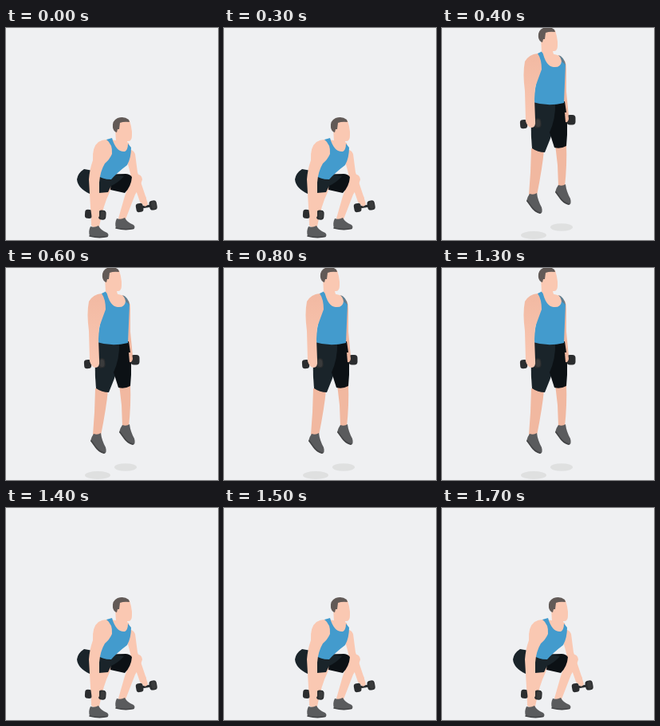
Write an HTML page without scripts that moves like this. It is 266 by 266 pixels and loops after 1.8 s.

```html
<!DOCTYPE html>
<html lang="en">
<head>
<meta charset="utf-8">
<title>Dumbbell squat jump</title>
<style>
  html, body { margin: 0; width: 100%; height: 100%; overflow: hidden; background: #eff0f2; }
  svg { display: block; width: 100%; height: 100%; }
  .skin { fill: #fac8b2; }
  .shade { fill: #f1b8a0; }
  .arm { fill: url(#arm-tone); }
  .hair { fill: #625a57; }
  .top { fill: #439bcd; }
  .strap { fill: #5f7f92; }
  .shorts { fill: #1a242a; }
  .shorts-far { fill: #0c1115; }
  .shoe { fill: #5a5b5d; }
  .sole { fill: none; stroke: #444547; stroke-width: 1.6; stroke-linecap: round; }
  .shadow { fill: #dfe0e0; }
  .weight { fill: #2b2d2f; }
  .plate { fill: #3a3b3c; }
  .squat { animation: squat 1.8s step-end infinite; }
  .jump { animation: jump 1.8s step-end infinite; }
  /* The jump is held for one second, from 0.4 s to 1.4 s. */
  @keyframes squat { 0%, 77.7778% { visibility: visible; } 22.2222% { visibility: hidden; } }
  @keyframes jump { 0%, 77.7778% { visibility: hidden; } 22.2222% { visibility: visible; } }
</style>
</head>
<body>
<svg viewBox="0 0 266 266">
  <defs>
    <linearGradient id="arm-tone" x1="0" y1="0" x2="0" y2="1">
      <stop offset="0" stop-color="#f2b9a2"/>
      <stop offset="1" stop-color="#fac8b3"/>
    </linearGradient>
    <g id="head">
      <path class="skin" d="M3 13 L4 31 Q10 38 19 34 L18 30 Q24 31 24 23 L24 18 Q23 10 21 4 L8 5Z"/>
      <path class="hair" d="M0 13 Q-1 4 6 1 Q14 -2 20 3 L21 6 Q14 5 9 7 L8 15 L6 15 L5 19 Q1 18 0 13Z"/>
    </g>
    <g id="shoe">
      <path class="shoe" d="M1 1 Q6 3 11 0 Q14 6 22 9 Q25 12 22 14 Q12 16 0 13 Q-2 7 1 1Z"/>
      <path class="sole" d="M0 13 Q12 16 22 13.5"/>
    </g>
    <g id="toe-down-shoe">
      <path class="shoe" d="M4 1 Q9 3 13 0 Q14 9 19 18 Q21 25 17 26 Q9 24 5 16 L0 10 Q1 5 4 1Z"/>
      <path class="sole" d="M1 10 L6 17 Q10 23 17 25"/>
    </g>
    <g id="dumbbell">
      <rect class="weight" x="-9" y="-1.5" width="18" height="3"/>
      <rect class="weight" x="-13" y="-5.5" width="9" height="11" rx="3.5"/>
      <rect class="weight" x="4" y="-6" width="9.5" height="12" rx="4"/>
      <ellipse class="plate" cx="9.5" cy="0" rx="3" ry="4.8"/>
    </g>
  </defs>

  <g class="squat">
    <path class="skin" d="M149 156 Q158 149 162 158 L165 181 L176 214 Q177 221 172 222 L168 218 L157 186Z"/>
    <path class="skin" d="M140 187 L158 184 Q170 181 171 190 Q169 198 162 209 L150 240 Q145 243 141 239 L149 211 L153 200Z"/>
    <path class="shorts-far" d="M118 184 L150 183 Q155 183 158 187 Q157 199 149 207 L131 203Z"/>
    <use href="#shoe" x="138" y="238"/>
    <path class="skin" d="M105 190 L129 192 Q133 198 130 206 Q122 222 117 249 Q112 252 107 248 L106 208Z"/>
    <path class="shorts" d="M98 177 L120 181 L148 186 Q141 194 132 198 L128 206 L105 208 Q90 201 89 190 Q90 182 98 177Z"/>
    <use href="#shoe" x="105" y="248"/>
    <path class="skin" d="M132 140 L154 144 L156 155 L145 162 L134 153Z"/>
    <path class="top" d="M126 140 L133 138 Q138 156 149 155 Q153 153 153 145 L157 150 Q157 163 152 172 Q140 181 132 190 Q120 190 114 184 L122 163Z"/>
    <use href="#head" x="134" y="112"/>
    <use href="#dumbbell" transform="translate(112 234) rotate(4)"/>
    <path class="skin" d="M126 140 Q134 146 133 158 Q130 165 124 170 Q118 180 117 194 L117 236 Q114 243 108 240 L106 225 L104 190 Q105 177 109 166 Q108 149 116 143 Q121 140 126 140Z"/>
    <use href="#dumbbell" transform="translate(176 224) rotate(-10)"/>
    <path class="skin" d="M170 213 L175 211 L178 221 Q175 226 172 222Z"/>
  </g>

  <g class="jump">
    <ellipse class="shadow" cx="115" cy="260" rx="16" ry="5"/>
    <ellipse class="shadow" cx="150" cy="250" rx="14" ry="4.8"/>
    <path class="shade" d="M149 38 Q156 39 156 51 L156 80 L159 111 Q160 119 155 119 L152 110 L150 70Z"/>
    <path class="shade" d="M142 146 L156 146 Q157 172 154 199 Q150 202 146 198 L145 172Z"/>
    <path class="shade" d="M112 151 L128 153 Q126 175 119 210 Q114 213 109 209 L111 181Z"/>
    <use href="#toe-down-shoe" x="142" y="196"/>
    <use href="#toe-down-shoe" x="106" y="207"/>
    <path class="shorts" d="M114 92 L147 94 Q143 124 129 156 Q120 156 113 151 Q110 120 114 92Z"/>
    <path class="shorts-far" d="M142 94 L154 92 Q159 119 156 148 Q149 152 141 150 L135 131 Q143 113 142 94Z"/>
    <path class="skin" d="M125 29 L149 35 L151 47 L141 52 L127 44Z"/>
    <path class="strap" d="M146 34 Q153 36 155 46 L150 47 Q151 39 146 34Z"/>
    <path class="top" d="M120 32 L126 29 Q130 48 140 49 Q149 50 150 42 L155 46 Q154 69 153 94 Q133 99 114 93 L119 65Z"/>
    <use href="#head" x="121" y="-1"/>
    <rect class="weight" x="156.5" y="109" width="11" height="12.5" rx="4"/>
    <path class="shade" d="M154 106 L158 106 L159 114 Q158 119 155 118Z"/>
    <use href="#dumbbell" transform="translate(111 120) rotate(-4)"/>
    <path class="arm" d="M120 32 Q125 39 125 52 Q122 60 117 74 L116 89 L117 116 Q118 125 112 125 Q107 124 105 117 L104 79 Q101 57 104 42 Q109 33 120 32Z"/>
  </g>
</svg>
</body>
</html>
```
